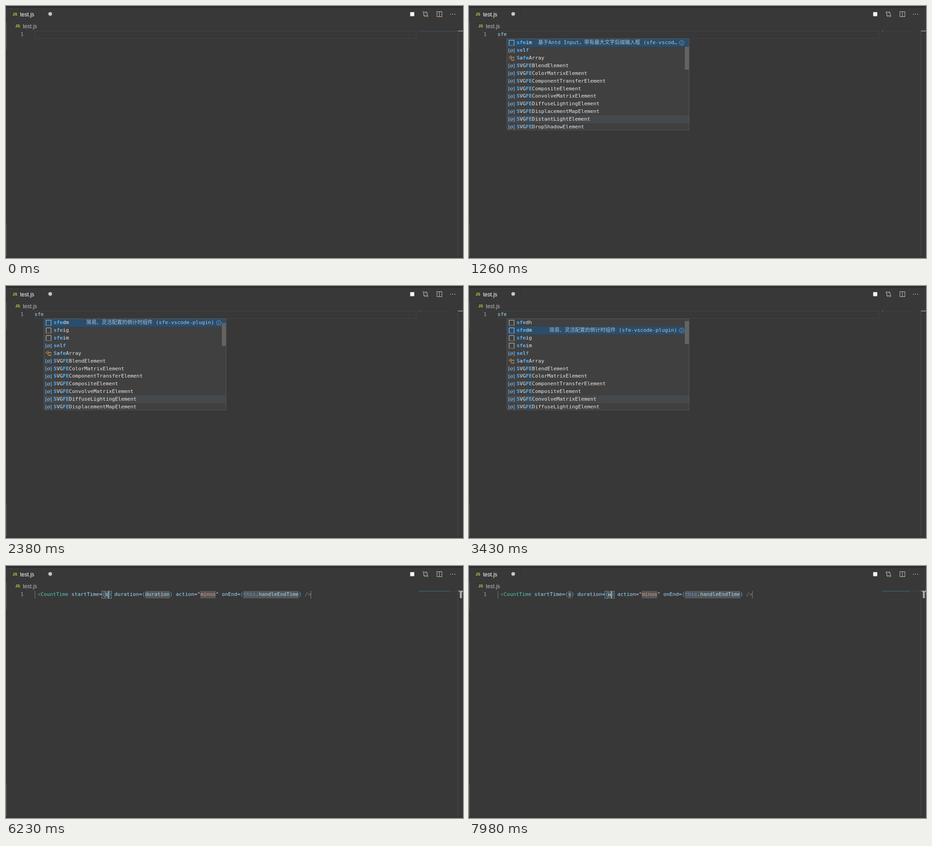
An HTML page with a canvas that plays this animation: 1008x556 px, repeating every 8000 ms.

```html
<!DOCTYPE html>
<html lang="en">
<head>
<meta charset="utf-8">
<title>Editor snippets</title>
<style>
html, body { margin: 0; width: 100%; height: 100%; overflow: hidden; background: #383838; }
canvas { display: block; width: 1008px; height: 556px; }
</style>
</head>
<body>
<canvas id="stage"></canvas>
<script>
const W = 1008, H = 556, LOOP = 8000;
const canvas = document.getElementById('stage');
const ctx = canvas.getContext('2d');
const dpr = window.devicePixelRatio || 1;
canvas.width = W * dpr;
canvas.height = H * dpr;

const MONO = '11.25px "DejaVu Sans Mono", "Noto Sans CJK SC", "Noto Sans CJK", monospace';
const UI = '12px "Liberation Sans", Arial, sans-serif';
const CHAR = 6.773, TEXT_X = 63, ROW_H = 16.85;

// Key times in ms
const T = { s: 280, sf: 420, sfe: 560, popup: 700, insert: 3570, unmark: 6020,
            typeS: 6230, tab: 6580, typeW: 7840 };

// Selected entry and first visible entry, from a given time on
const PICKS = [[700, 3, 3], [1470, 2, 2], [1960, 1, 1], [2450, 0, 0], [2800, 1, 0]];

// Matched letters stand between asterisks
const ITEMS = ['*sfe*dh', '*sfe*dm', '*sfe*ig', '*sfe*im', '*se*l*f*', '*S*a*fe*Array'].concat(
  ['Blend', 'ColorMatrix', 'ComponentTransfer', 'Composite', 'ConvolveMatrix', 'DiffuseLighting',
   'DisplacementMap', 'DistantLight', 'DropShadow'].map(n => '*S*VG*FE*' + n + 'Element'));
const NOTES = [
  '简易、灵活配置的小时倒计时 (sfe-vscode-plugin)',
  '简易、灵活配置的倒计时组件 (sfe-vscode-plugin)',
  '基于Antd Input，带有图标的输入框 (sfe-vscode-…',
  '基于Antd Input，带有最大文字后缀输入框 (sfe-vscod…'
];

function box(x, y, w, h, color) {
  ctx.fillStyle = color;
  ctx.fillRect(x, y, w, h);
}
function frame(x, y, w, h, color) {
  ctx.strokeStyle = color;
  ctx.lineWidth = 1;
  ctx.strokeRect(x + 0.5, y + 0.5, w - 1, h - 1);
}
function text(str, x, y, color, font = MONO, align = 'left') {
  ctx.font = font;
  ctx.textAlign = align;
  ctx.fillStyle = color;
  ctx.fillText(str, x, y);
}
function line(points, color, width = 1, close = false) {
  ctx.beginPath();
  points.forEach(([x, y]) => ctx.lineTo(x, y));
  if (close) ctx.closePath();
  ctx.strokeStyle = color;
  ctx.lineWidth = width;
  ctx.stroke();
}
function circle(x, y, r, color, fill) {
  ctx.beginPath();
  ctx.arc(x, y, r, 0, Math.PI * 2);
  if (fill) {
    ctx.fillStyle = color;
    ctx.fill();
  } else {
    ctx.strokeStyle = color;
    ctx.lineWidth = 1;
    ctx.stroke();
  }
}

function drawToolbar() {
  box(891.5, 13.5, 9, 9, '#f4f4f4');
  const c = '#c5c5c5';
  circle(921.5, 14, 1.7, c);
  circle(929, 22, 1.7, c);
  line([[921.5, 16], [921.5, 22], [925, 22]], c);
  line([[923.5, 20], [925.5, 22], [923.5, 24]], c);
  line([[929, 20], [929, 14], [925.5, 14]], c);
  line([[927, 12], [925, 14], [927, 16]], c);
  frame(950, 12, 12, 12, c);
  box(955.5, 12, 1, 12, c);
  for (const x of [980.5, 985.3, 990]) circle(x, 18, 0.9, c, true);
}

function drawChrome() {
  box(0, 0, W, H, '#383838');
  box(0, 0, W, 1, '#444444');
  box(0, 1, W, 1.5, '#1c1c1c');
  box(115, 5, W - 115, 1, '#353535');
  box(114, 5, 1, 25, '#333333');
  const js = 'bold 8.5px "Liberation Sans", Arial, sans-serif';
  text('JS', 14.5, 21, '#d2d246', js);
  text('test.js', 31, 22.5, '#ffffff', UI);
  circle(97.5, 17.5, 4, '#c8c8c8', true);
  text('JS', 20.5, 47.3, '#d2d246', js);
  text('test.js', 37, 49, '#b9b9b9', UI);
  drawToolbar();
  text('1', 32, 66.2, '#a5a5a5');
  box(0, 35, 1.5, 61, '#505050');
  box(0, 481, 1.5, 70, '#505050');
  box(996, 55, 1, 497, '#4b4b4b');
  box(997, 54.5, 11, 1.3, '#b0b0b0');
  box(0, 552, W, 1, '#343434');
}

function drawMinimap(t) {
  if (t < T.s) return box(910, 55, 86, 1, '#3b566d');
  if (t < T.insert) {
    box(916, 55, 64, 1, '#3a444c');
    return box(910.5, 54.5, 3, 1, '#66889c');
  }
  const end = t < T.typeS ? 980 : t < T.typeW ? 978 : 972;
  box(910, 55, 86, 1, '#3b4a55');
  box(911, 55, end - 911, 1, '#47717f');
}

function drawCaret(col) {
  box(TEXT_X + col * CHAR, 55, 1.3, 16.5, '#c4c4c4');
}

// The blink restarts whenever something is typed
function caretOn(t) {
  if (t < T.s) return false;
  const start = t >= T.typeW ? T.typeW : t >= T.tab ? T.tab
    : t >= T.typeS ? T.typeS : 630;
  return t < start || Math.floor((t - start) / 490) % 2 === 0;
}

function snippetIcon(x, y) {
  const c = '#c9cdd0';
  line([[x + 2.5, y + 14], [x + 2.5, y + 2.5], [x + 13.5, y + 2.5], [x + 13.5, y + 14]], c);
  for (let i = 0; i < 6; i++) box(x + 2.5 + i * 2, y + 13.5, 1, 1, c);
}
function variableIcon(x, y) {
  const c = '#75beff';
  line([[x + 3.5, y + 4.5], [x + 1.5, y + 4.5], [x + 1.5, y + 13], [x + 3.5, y + 13]], c);
  line([[x + 12, y + 4.5], [x + 14, y + 4.5], [x + 14, y + 13], [x + 12, y + 13]], c);
  line([[x + 4.5, y + 8], [x + 8.5, y + 5.7], [x + 11, y + 7.2], [x + 11, y + 9.7],
        [x + 7, y + 12], [x + 4.5, y + 10.5]], c, 1, true);
  line([[x + 4.5, y + 8], [x + 7, y + 9.4], [x + 11, y + 7.2]], c, 0.8);
}
function classIcon(x, y) {
  const c = '#e8ab53';
  const diamond = (a, b, r) =>
    line([[a - r, b], [a, b - r], [a + r, b], [a, b + r]], c, 1, true);
  line([[x + 2, y + 7], [x + 6, y + 3], [x + 8, y + 5], [x + 4, y + 9]], c, 1, true);
  line([[x + 7, y + 6.5], [x + 11, y + 6.5]], c);
  line([[x + 7, y + 6.5], [x + 7, y + 12.5], [x + 11, y + 12.5]], c);
  diamond(12.3 + x, y + 7, 1.7);
  diamond(12.3 + x, y + 12.5, 1.7);
}

function drawLabel(label, y) {
  let x = 105;
  label.split('*').forEach((part, i) => {
    text(part, x, y, i % 2 ? '#52b1ff' : '#e8e8e8', i % 2 ? 'bold ' + MONO : MONO);
    x += part.length * CHAR;
  });
}

function drawPopup(t) {
  const [, picked, first] = PICKS.filter(p => p[0] <= t).pop();
  box(0, 401, 1, 80, '#404040');
  box(83, 72, 403, 202, '#404040');
  box(84, 73 + 10 * ROW_H, 401, ROW_H, '#46494b');
  for (let row = 0; row < 12; row++) {
    const i = first + row, y = 73 + row * ROW_H, base = y + 11.4;
    if (i === picked) {
      box(84, y, 401, ROW_H, '#294e6d');
      text(NOTES[i], 459, base, '#b0c2d0', MONO, 'right');
      circle(469.3, y + 8.2, 5, '#7fa6c4');
      box(468.8, y + 7.2, 1, 4, '#7fa6c4');
      box(468.8, y + 5, 1, 1.2, '#7fa6c4');
    }
    const icon = i < 4 ? snippetIcon : i === 5 ? classIcon : variableIcon;
    icon(86, y);
    drawLabel(ITEMS[i], base);
  }
  box(476, 77.3 + first * 4.25, 9.5, 50.5, '#636363');
  frame(83, 72, 403, 202, '#565656');
}

function drawSnippet(t) {
  const start = t < T.typeS ? 'time' : 's';
  const span = t < T.typeW ? 'duration' : 'w';
  const ATTR = '#9cdcfe', BRACE = '#569cd6', PLAIN = '#d4d4d4', TAG = '#8a8a8a';
  const SLOT = 'rgba(140,140,140,.35)', MATCH = 'rgba(140,152,156,.33)', PICK = '#5380a6';
  const inStart = t < T.tab;
  const typed = (t >= T.typeS && t < T.tab) || t >= T.typeW;
  const timeMark = t < T.unmark && MATCH;
  const spanMark = t >= T.tab && t < T.typeW && MATCH;
  const startFill = t < T.typeS ? PICK : SLOT;
  const spanFill = t >= T.tab && t < T.typeW ? PICK : SLOT;

  const tokens = [
    [' '], ['<', TAG], ['Count', '#4ec9b0'], ['Time', '#4ec9b0', timeMark],
    [' start', ATTR], ['Time', ATTR, timeMark], ['=', PLAIN],
    ['{', BRACE], [start, ATTR, startFill], ['}', BRACE],
    [' ', ATTR], ['duration', ATTR, spanMark], ['=', PLAIN],
    ['{', BRACE], [span, ATTR, spanFill], ['}', BRACE],
    [' action', ATTR], ['="', PLAIN], ['minus', '#d69d85', SLOT], ['"', PLAIN],
    [' onEnd', ATTR], ['=', PLAIN], ['{', BRACE], ['this', BRACE, SLOT], ['.', PLAIN, SLOT],
    ['handleEnd', ATTR, SLOT], ['Time', ATTR, SLOT, timeMark], ['}', BRACE], [' />', TAG]
  ];
  const active = inStart ? 8 : 14;
  let col = 0, caretCol = 0;
  tokens.forEach(([str, color, ...fills], i) => {
    const x = TEXT_X + col * CHAR, w = str.length * CHAR;
    for (const fill of fills) if (fill) box(x, 55, w, 16.5, fill);
    if (typed && Math.abs(i - active) === 1) {
      box(x, 55, w, 16.5, 'rgba(30,90,110,.35)');
      frame(Math.round(x) - 1, 55, 8, 17, '#8a8a8a');
    }
    if (color) text(str, x, 66.2, color);
    col += str.length;
    if (i === active) caretCol = col;
  });
  box(63.5, 55, 1, 17, '#7c7c7c');
  box(TEXT_X + col * CHAR - 0.6, 55, 1, 17, '#8c8c8c');
  if (caretOn(t)) drawCaret(caretCol);
  if (typed) {
    box(1000, 55, 8, 2.5, '#a8a8a8');
    box(1001, 55, 4.5, 16, '#a8a8a8');
  }
}

function drawTyping(t) {
  frame(63, 55, 842, 17, '#434343');
  const typed = 'sfe'.slice(0, [T.s, T.sf, T.sfe].filter(k => t >= k).length);
  text(typed, TEXT_X, 66.2, '#9cdcfe');
  if (caretOn(t)) drawCaret(typed.length);
  if (t >= T.popup) drawPopup(t);
}

function render(t) {
  ctx.setTransform(dpr, 0, 0, dpr, 0, 0);
  drawChrome();
  drawMinimap(t);
  (t < T.insert ? drawTyping : drawSnippet)(t);
}

const begin = performance.now();
function tick() {
  render((performance.now() - begin) % LOOP);
  requestAnimationFrame(tick);
}
tick();
</script>
</body>
</html>
```
